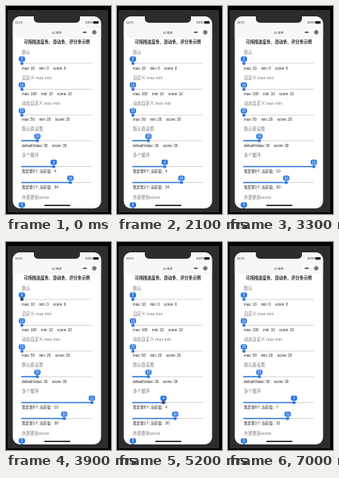
An HTML page with a canvas that plays this animation: 132x261 px, repeating every 8.3 s.

```html
<!DOCTYPE html>
<html lang="zh">
<head>
<meta charset="utf-8">
<style>
  html, body { margin: 0; width: 100%; height: 100%; overflow: hidden; background: #000; }
  canvas { display: block; width: 132px; height: 261px; }
</style>
</head>
<body>
<canvas id="stage"></canvas>
<script>
const WIDTH = 132, HEIGHT = 261, LOOP = 8300, STEP = 100;
const LEFT = 20, RIGHT = 108, BLUE = '#2f78df';
const FONT = '"Liberation Sans", "Noto Sans CJK SC", "Noto Sans CJK", sans-serif';
const canvas = document.getElementById('stage');
const ctx = canvas.getContext('2d');
const ratio = window.devicePixelRatio || 1;
canvas.width = WIDTH * ratio;
canvas.height = HEIGHT * ratio;

// Keyframes: [time, x] or [time, x, y]
const firstDrag = [[0, 60], [2700, 60], [2701, 108], [4800, 108], [5200, 58.5], [5400, 51.5], [5700, 83]];
const secondDrag = [[0, 81], [2700, 81], [2701, 73.2], [6000, 73.2], [6200, 81], [6500, 38.5], [6700, 45], [6850, 88], [7000, 75]];
const pointerPath = [[3600, 34, 78], [3900, 20, 71.5], [4100, 20, 71.5], [4700, 108, 201]];

function sample(keys, time, axis = 1) {
  if (time <= keys[0][0]) return keys[0][axis];
  for (let i = 1; i < keys.length; i++) {
    const a = keys[i - 1], b = keys[i];
    if (time <= b[0]) {
      const p = (time - a[0]) / (b[0] - a[0]);
      return a[axis] + (b[axis] - a[axis]) * p * p * (3 - 2 * p);
    }
  }
  return keys[keys.length - 1][axis];
}

function box(x, y, w, h, r, color) {
  ctx.fillStyle = color;
  ctx.beginPath();
  ctx.roundRect(x, y, w, h, r);
  ctx.fill();
}

function dot(x, y, r, color) {
  ctx.fillStyle = color;
  ctx.beginPath();
  ctx.arc(x, y, r, 0, Math.PI * 2);
  ctx.fill();
}

function text(str, x, y, size, color = '#222', align = 'left', weight = 400) {
  ctx.font = `${weight} ${size}px ${FONT}`;
  ctx.fillStyle = color;
  ctx.textAlign = align;
  ctx.textBaseline = 'alphabetic';
  ctx.fillText(str, x, y + size * 0.36);
  return ctx.measureText(str).width;
}

function info(items, y) {
  let x = LEFT;
  for (const item of items) x += text(item, x, y, 4.5) + 5.5;
}

function slider(x, y, value) {
  box(LEFT - 1, y - 0.6, RIGHT - LEFT + 1, 1.2, 0.6, '#d5d5d5');
  if (x > LEFT) box(LEFT - 1, y - 0.7, x - LEFT + 1, 1.4, 0.7, BLUE);
  dot(x, y, 2, BLUE);
  box(x - 4, y - 8.8, 8, 6.6, 2.4, BLUE);
  text(String(value), x, y - 5.5, 4.5, '#fff', 'center');
}

function drawPhone() {
  ctx.fillStyle = '#000';
  ctx.fillRect(0, 0, WIDTH, HEIGHT);
  box(2, 5, 126.5, 254, 0, '#2c2c2c');
  box(8.5, 13, 111, 241, 9, '#fff');
}

function drawChrome() {
  box(8.5, 13, 111, 27, [9, 9, 0, 0], '#f7f7f7');
  box(35, 12, 58, 9, [0, 0, 5, 5], '#2c2c2c');
  text('11:53', 11.5, 20.5, 3.7);
  text('100%', 99.5, 20.5, 3.6);
  box(109.5, 19, 7, 3.2, 0.8, '#222');
  text('UI-组件', 64, 33.5, 3.7, '#333', 'center');
  box(93.5, 28.5, 23.5, 9, 4.5, '#fcfcfc');
  for (const x of [97, 99, 101]) dot(x, 33, x === 99 ? 1 : 0.7, '#111');
  ctx.strokeStyle = '#111';
  ctx.lineWidth = 0.9;
  ctx.beginPath();
  ctx.arc(111, 33, 2.2, 0, Math.PI * 2);
  ctx.stroke();
  dot(111, 33, 0.9, '#111');
}

function drawPage(time) {
  text('可拖拽进度条、滑动条、评分条示例', 64, 45, 5.2, '#222', 'center', 700);
  const headings = [
    ['默认', 58], ['自定义 max min', 90], ['动态自定义 max min', 122],
    ['默认值设置', 154.5], ['多个循环', 187], ['外部更新score', 240]
  ];
  for (const [label, y] of headings) text(label, LEFT, y, 5.3, '#777');

  slider(LEFT, 72, 0);
  info(['max: 10', 'min: 0', 'score: 0'], 78);
  slider(LEFT, 104.5, 10);
  info(['max: 100', 'min: 10', 'score: 10'], 110.5);
  slider(LEFT, 137, 20);
  info(['max: 50', 'min: 20', 'score: 20'], 142.5);
  slider(39.5, 169, 30);
  info(['defaultValue: 30', 'score: 30'], 175);

  const rows = [[firstDrag, 10, 201.5], [secondDrag, 50, 221.5]];
  rows.forEach(([keys, max, y], index) => {
    const x = sample(keys, time);
    const value = Math.floor((x - LEFT) / (RIGHT - LEFT) * max);
    slider(x, y, value);
    text(`我是第${index}个,当前值：${value}`, LEFT, y + 5.8, 4.6);
  });
  slider(LEFT, 255, 0);
}

function drawPointer(time) {
  if (time < 3600 || time >= 7000) return;
  let x, y;
  if (time <= 4700) {
    x = sample(pointerPath, time);
    y = sample(pointerPath, time, 2);
  } else if (time <= 5700) {
    x = sample(firstDrag, time);
    y = 201;
  } else if (time <= 6000) {
    const p = (time - 5700) / 300;
    x = 83 - 8 * p;
    y = 201 + 20 * p;
  } else {
    x = sample(secondDrag, time);
    y = 221;
  }
  dot(x, y, 2.4, 'rgba(45,45,45,0.6)');
}

function draw(now) {
  const time = Math.floor((now % LOOP) / STEP) * STEP;
  ctx.setTransform(ratio, 0, 0, ratio, 0, 0);
  drawPhone();
  ctx.save();
  ctx.beginPath();
  ctx.roundRect(8.5, 13, 111, 241, 9);
  ctx.clip();
  if (time < 2700 || time >= 3100) drawPage(time);
  drawChrome();
  box(48, 249.5, 33, 1.5, 0.75, '#111');
  drawPointer(time);
  ctx.restore();
}

const start = performance.now();
function tick() {
  draw(performance.now() - start);
  requestAnimationFrame(tick);
}
tick();
</script>
</body>
</html>
```
